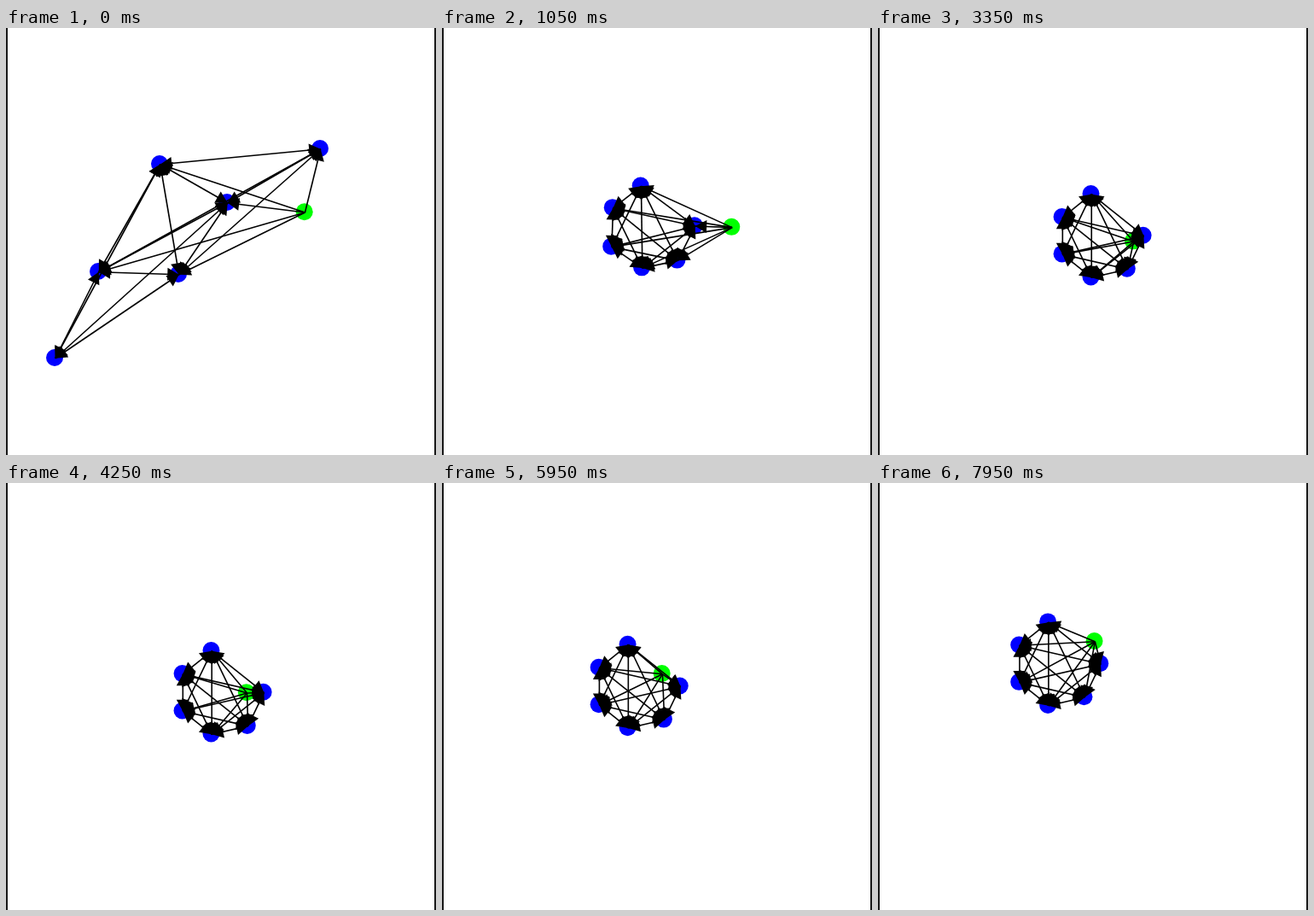
An HTML page with a canvas that plays this animation: 504 by 500 pixels, repeating every 8000 ms.

```html
<!DOCTYPE html>
<html lang="en">
<head>
<meta charset="utf-8">
<title>Leader and followers</title>
<style>
  html, body { margin: 0; width: 100%; height: 100%; overflow: hidden; background: #fff; }
  canvas { display: block; }
</style>
</head>
<body>
<canvas id="stage" width="504" height="500"></canvas>
<script>
const ctx = document.getElementById('stage').getContext('2d');

const STEP = 50, LOOP = 8000, SUBSTEPS = 5;
const GAIN = 0.62;         // attraction per second along each link
const RANGE = 300;         // agents farther apart than this are not linked
const RADIUS = 10, HEAD_LENGTH = 13.5, HEAD_HALF = 7.5;
const LINK_SHIFT = 0.75;   // links sit slightly right of and below the discs
const SPACING = 50;        // radius of the heptagon formation

// Start positions, in the order of the formation's corners.
const starts = [[368, 141], [202, 288], [259, 204], [57, 386], [180, 159], [108, 285]];
const offsets = starts.map((_, i) => {
  const angle = i * 2 * Math.PI / 7;
  return { x: SPACING * Math.cos(angle), y: SPACING * Math.sin(angle) };
});
const leaderOffset = { x: SPACING, y: 0 };

// The leader circles at a constant speed.
function leaderAt(seconds) {
  const angle = (18.8 + 22.3 * seconds) * Math.PI / 180;
  return { x: 302 + 50.4 * Math.cos(angle), y: 199 + 50.4 * Math.sin(angle) };
}

const linked = (a, b) => Math.hypot(a.x - b.x, a.y - b.y) < RANGE;

// Each follower moves towards its place relative to every linked agent.
function advance(followers, leader, dt) {
  const agents = [...followers, leader];
  const places = [...offsets, leaderOffset];
  return followers.map((me, i) => {
    let vx = 0, vy = 0;
    agents.forEach((other, j) => {
      if (i === j || !linked(me, other)) return;
      vx += other.x - me.x - (places[j].x - places[i].x);
      vy += other.y - me.y - (places[j].y - places[i].y);
    });
    return { x: me.x + GAIN * vx * dt, y: me.y + GAIN * vy * dt };
  });
}

function simulate() {
  const poses = [];
  const dt = STEP / 1000 / SUBSTEPS;
  let followers = starts.map(([x, y]) => ({ x, y }));
  for (let n = 0; n < LOOP / STEP; n++) {
    const seconds = n * STEP / 1000;
    poses.push({ followers, leader: leaderAt(seconds) });
    for (let s = 0; s < SUBSTEPS; s++) {
      followers = advance(followers, leaderAt(seconds + s * dt), dt);
    }
  }
  return poses;
}

function drawDisc({ x, y }, color) {
  ctx.fillStyle = color;
  ctx.beginPath();
  ctx.arc(x, y, RADIUS, 0, 2 * Math.PI);
  ctx.fill();
}

function drawLine(a, b) {
  ctx.beginPath();
  ctx.moveTo(a.x, a.y);
  ctx.lineTo(b.x, b.y);
  ctx.stroke();
}

// Arrowhead whose tip lies on the centre of the receiving agent.
function drawHead(from, to) {
  ctx.save();
  ctx.translate(to.x, to.y);
  ctx.rotate(Math.atan2(from.y - to.y, from.x - to.x));
  ctx.beginPath();
  ctx.moveTo(0, 0);
  ctx.lineTo(HEAD_LENGTH, -HEAD_HALF);
  ctx.lineTo(HEAD_LENGTH, HEAD_HALF);
  ctx.fill();
  ctx.restore();
}

function draw({ followers, leader }) {
  ctx.fillStyle = '#fff';
  ctx.fillRect(0, 0, 504, 500);
  ctx.fillStyle = '#1a1a1a';
  ctx.fillRect(0, 0, 2, 500);
  ctx.fillRect(502, 0, 2, 500);

  followers.forEach(f => drawDisc(f, '#00f'));
  drawDisc(leader, '#0f0');

  ctx.fillStyle = ctx.strokeStyle = '#000';
  ctx.lineWidth = 1.6;
  ctx.save();
  ctx.translate(LINK_SHIFT, LINK_SHIFT);
  const agents = [...followers, leader];
  followers.forEach((me, i) => {
    agents.forEach((other, j) => {
      if (i === j || !linked(me, other)) return;
      if (j > i) drawLine(other, me);
      drawHead(other, me);
    });
  });
  ctx.restore();
}

const poses = simulate();
const begin = performance.now();

function tick() {
  const time = (performance.now() - begin) % LOOP;
  draw(poses[Math.floor(time / STEP)]);
  requestAnimationFrame(tick);
}
tick();
</script>
</body>
</html>
```
